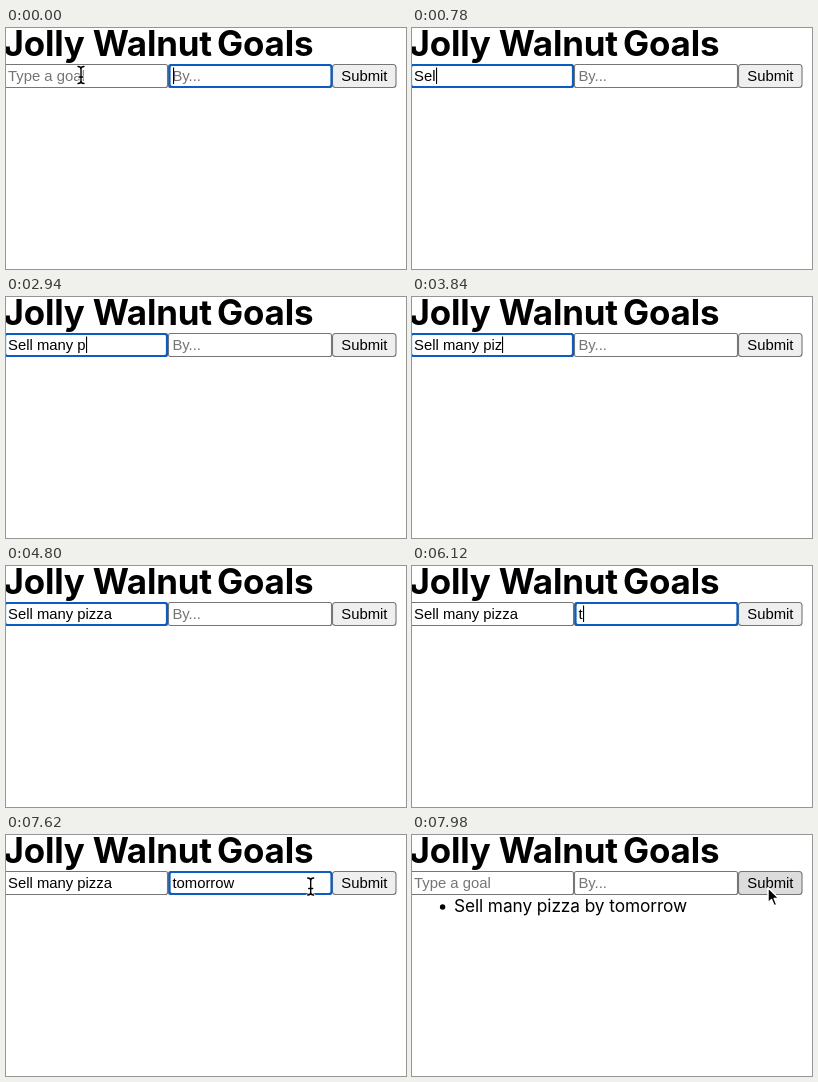
Recreate the animation shown at these times as an HTML page. Size 400 by 241 pixels, loop 8 s.

```html
<!DOCTYPE html>
<html lang="en">
<head>
<meta charset="utf-8">
<title>Goals form</title>
<style>
  html, body { margin: 0; width: 100%; height: 100%; overflow: hidden; background: #fff; }
  svg { display: block; width: 400px; height: 241px; }
  text { white-space: pre; }
  .page { font-family: Inter, sans-serif; letter-spacing: -.005em; }
  .title { font-size: 34.9px; font-weight: 700; }
  .item { font-size: 17.3px; }
  .form { font: 14.85px "Liberation Sans", Arial, sans-serif; }
  .box { stroke: #767676; stroke-width: 1.1; }
  .ring { fill: none; stroke: #0b5cc4; stroke-width: 2.2; }
</style>
</head>
<body>
<svg viewBox="0 0 400 241" xmlns="http://www.w3.org/2000/svg">
  <rect width="400" height="241" fill="#fff"/>
  <g class="page title">
    <text x="-2.5" y="27.6">Jolly Walnut</text>
    <text x="211" y="27.6">Goals</text>
  </g>
  <g class="form">
    <rect class="box" fill="#fff" x="-1.5" y="36.5" width="163" height="23" rx="2"/>
    <rect class="box" fill="#fff" x="162.5" y="36.5" width="163" height="23" rx="2"/>
    <rect class="box" id="button" x="326.5" y="36.5" width="63.5" height="23" rx="3"/>
    <rect class="ring" id="ring" y="37" height="22" rx="2.5"/>
    <text id="goal" x="2" y="53"/>
    <text id="by" x="166.4" y="53"/>
    <text x="358.4" y="53" text-anchor="middle">Submit</text>
    <rect id="caret" y="39.5" width="1.1" height="16.5"/>
  </g>
  <g class="page item" id="list">
    <circle cx="30.6" cy="72" r="2.7"/>
    <text x="41.9" y="77.4">Sell many pizza by tomorrow</text>
  </g>
  <g id="beam" fill="none" stroke-linecap="round">
    <path id="halo" stroke="#fff" stroke-width="3"/>
    <path id="stem" stroke="#000" stroke-width="1.4"/>
  </g>
  <path id="arrow" d="M0 0V15.2L3.5 12L6.2 18.2L8.8 17.1L6.2 11H11Z"
        fill="#000" stroke="#fff" stroke-width="1.5" stroke-linejoin="round"/>
</svg>
<script>
  const LOOP = 8000, STEP = 60;
  const TAB = 5220, MOVE = 7140, PRESS = 7800, ADD = 7920;
  const $ = id => document.getElementById(id);
  const ids = ["button", "ring", "goal", "by", "caret", "list", "beam", "arrow"];
  const el = Object.fromEntries(ids.map(id => [id, $(id)]));

  const beamPath = "M-3 -8.5Q0 -8.5 0 -6V6Q0 8.5 -3 8.5M3 -8.5Q0 -8.5 0 -6M0 6Q0 8.5 3 8.5M-2 2H2";
  $("halo").setAttribute("d", beamPath);
  $("stem").setAttribute("d", beamPath);

  const pen = document.createElement("canvas").getContext("2d");
  pen.font = '14.85px "Liberation Sans", Arial, sans-serif';

  // "<" is a backspace
  const fields = [
    { node: el.goal, hint: "Type a goal", x: 2, left: -1, width: 162, focus: 60,
      keys: "Sell many po<izza",
      times: [420, 600, 720, 840, 960, 1680, 1860, 2400, 2580, 2700, 2940,
              3240, 3480, 3600, 3720, 4140, 4380] },
    { node: el.by, hint: "By...", x: 166.4, left: 163.5, width: 162, focus: TAB,
      keys: "tomorrow",
      times: [6120, 6180, 6240, 6420, 6720, 6840, 6960, 7080] }
  ];

  function typed(field, t) {
    let text = "", last = t < field.focus ? 0 : field.focus;
    field.times.forEach((at, i) => {
      if (t < at) return;
      const key = field.keys[i];
      text = key === "<" ? text.slice(0, -1) : text + key;
      last = at;
    });
    return { text, last };
  }

  const show = (node, on) => node.setAttribute("visibility", on ? "visible" : "hidden");
  const set = (node, attrs) => {
    for (const name in attrs) node.setAttribute(name, attrs[name]);
  };

  function pointer(t) {
    if (t < MOVE) return [75, 47];
    const p = Math.min(1, (t - MOVE) / (PRESS - MOVE));
    const e = p * p * (3 - 2 * p);
    return [75 + 281 * e, 47 + 5.5 * e];
  }

  function draw(now) {
    const t = Math.floor(now % LOOP / STEP) * STEP;
    const done = t >= ADD;
    const states = fields.map(f => done ? { text: "", last: 0 } : typed(f, t));

    fields.forEach((f, i) => {
      const text = states[i].text;
      f.node.textContent = text || f.hint;
      set(f.node, { fill: text ? "#000" : "#757575" });
    });

    const at = t < 60 || t >= TAB ? 1 : 0;
    const f = fields[at], s = states[at], focused = t < PRESS;
    set(el.ring, { x: f.left, width: f.width });
    show(el.ring, focused);
    set(el.caret, { x: Math.round(f.x + pen.measureText(s.text).width + .1) });
    show(el.caret, focused && (t - s.last) % 900 < 420);

    const [x, y] = pointer(t);
    const over = x >= 326.5;
    show(el.beam, !over && (t < 420 || t >= MOVE));
    show(el.arrow, over);
    set(el.beam, { transform: `translate(${x} ${y})` });
    set(el.arrow, { transform: `translate(${x} ${y})` });
    set(el.button, { fill: t >= PRESS ? "#dcdcdc" : over ? "#e5e5e5" : "#efefef" });
    show(el.list, done);
  }

  function tick() {
    draw(performance.now());
    requestAnimationFrame(tick);
  }
  tick();
</script>
</body>
</html>
```
